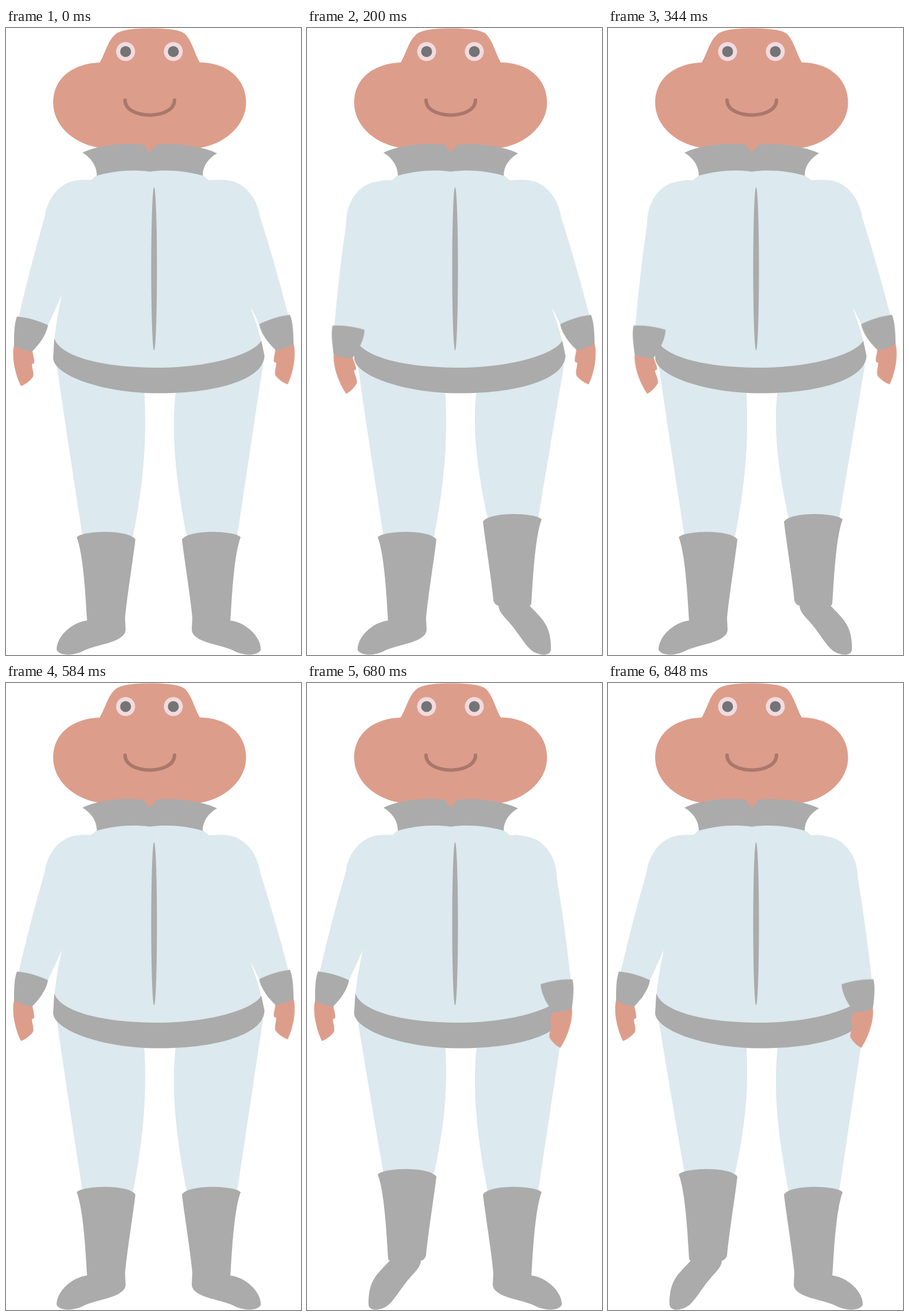
An HTML page without scripts that plays this animation: 513x1091 px, repeating every 0.96 s.

```html
<!DOCTYPE html>
<html lang="en">
<head>
<meta charset="utf-8">
<title>Marching figure</title>
<style>
html, body { margin: 0; width: 100%; height: 100%; overflow: hidden; background: #fff; }
svg { display: block; width: 100vw; height: 100vh; }
.skin { fill: #dd9d8b; }
.suit { fill: #dce9ee; }
.trim { fill: #ababab; }

.arm { transform-origin: 139px 342px; }
.arm.early { --t1: translate(2px, 0.6px) rotate(-8deg); }
.arm.late { --t0: rotate(1.4deg); --t1: translate(8.5px, 0.5px) rotate(-6.8deg); }
.leg { transform-origin: 0 590px; --t1: scaleY(0.894); }
.shaft { --t1: translateY(-31px); }
.flat { --o1: 0; }
.bent { --o0: 0; }

/* each pose snaps: early = second beat, late = fourth beat */
.early { animation: early 960ms step-end infinite; }
.late { animation: late 960ms step-end infinite; }
@keyframes early {
  0%, 45.8333%, 100% { transform: var(--t0, none); opacity: var(--o0, 1); }
  20.8333% { transform: var(--t1, none); opacity: var(--o1, 1); }
}
@keyframes late {
  0% { transform: var(--t0, none); opacity: var(--o0, 1); }
  70.8333%, 100% { transform: var(--t1, none); opacity: var(--o1, 1); }
}
</style>
</head>
<body>
<svg viewBox="0 0 513 1091" preserveAspectRatio="none">
  <defs>
    <path id="shaft" d="M123 886C134 874 214 872 225 890C221 925 211 985 207 1027C205 1033 202 1035 199 1036L146 1037Q141 1036 141 1032C138 980 134 915 123 886Z"/>
    <path id="flat" d="M141 1031C115 1034 88 1058 88 1082C93 1093 118 1093 136 1083C160 1072 207 1069 208 1047L207 1027Z"/>
    <path id="bent" d="M145 1004C123 1028 106 1038 107 1083C110 1093 124 1092 136 1086C150 1079 163 1052 179 1035C186 1026 198 1017 198 1004L190 995L150 995Z"/>
    <g id="arm">
      <path class="skin" d="M14 552C9 575 17 605 26 623C34 620 42 614 47 607C49 599 45 592 45 585L49 583C50 575 46 568 46 560Z"/>
      <path class="suit" d="M160 300L150 264.5C141 264 131 264 124 265C95 268 72 294 67 330Q43 412 22 503L30 510L70 519L73 517L97 465L160 330Z"/>
      <path class="trim" d="M19 502C40 504 58 510 73 517C71 532 58 551 45 563C34 562 24 558 14 553C14 535 14 515 19 502Z"/>
    </g>
    <g id="eye">
      <circle r="16.5" fill="#f1dbdf"/>
      <circle r="9.5" fill="#747474"/>
    </g>
  </defs>

  <path class="skin" d="M163 60C172 45 176 25 188 13C194 6 207 3 223 1.500Q250 -0.500 277 1.500C293 3 306 5 312 11C324 24 328 45 337 60C383 60 417.500 87 417.500 130C417.500 166 385 200 340 208L250 225L160 208C115 200 82 168 82 130C82 88 115 62 163 60Z"/>
  <use href="#eye" x="208" y="41"/>
  <use href="#eye" x="291" y="41"/>
  <path d="M207 125.5C207 160 293 160 293 125.5" fill="none" stroke="#a9786a" stroke-width="6" stroke-linecap="round"/>

  <path class="suit leg late" d="M88 585Q106 710 133 884H221C235 810 247 730 240 625Z"/>
  <path class="suit leg early" d="M447 585Q428 710 402 884H314C298 800 285 710 296 625Z"/>

  <g class="trim">
    <use href="#shaft" class="shaft late"/>
    <use href="#flat" class="flat late"/>
    <use href="#bent" class="bent late"/>
    <g transform="translate(531) scale(-1 1)">
      <use href="#shaft" class="shaft early"/>
      <use href="#flat" class="flat early"/>
      <use href="#bent" class="bent early"/>
    </g>
  </g>

  <path class="suit" d="M158 256L148 265L132 265.5C110 285 108 400 97 465Q86 515 84 548C100 585 180 605 265 605C350 605 425 590 444 548C441 530 433 507 427 491Q421 450 415 400C410 330 395 280 372 265H353L342 256L250 230Z"/>
  <ellipse class="trim" cx="257.5" cy="419" rx="5" ry="142"/>
  <path class="trim" d="M133 217C150 208 190 198 239 203L250 217L262 203C300 199 345 207 367 218C352 227 342 240 342 257C310 248 280 246 250 250C220 246 190 248 158 257C158 240 148 226 133 217Z"/>
  <path class="trim" d="M84 540C94 571 165 591 265 591C350 591 430 569 444 544L449.500 570C449 610 370 636 265 635.500C165 635.500 82 603 82 574Z"/>

  <use href="#arm" class="arm early"/>
  <g transform="translate(509) scale(-1 1)">
    <use href="#arm" class="arm late"/>
  </g>
</svg>
</body>
</html>
```
